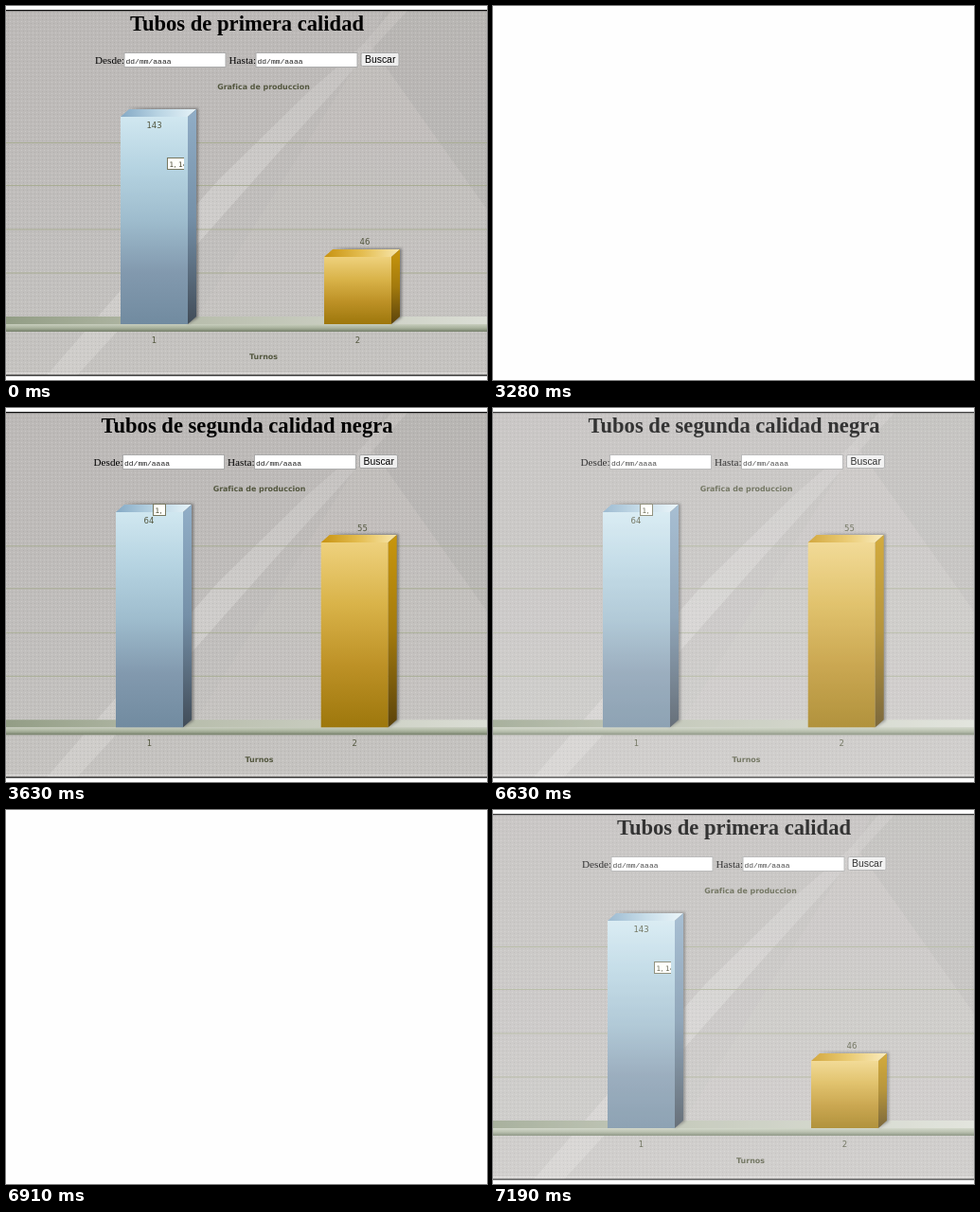
Write an HTML page that moves like this. It is 508 by 395 pixels and loops after 7260 ms.

```html
<!DOCTYPE html>
<html lang="es">
<head>
<meta charset="utf-8">
<title>Grafica de produccion</title>
<style>
html, body { margin: 0; width: 100%; height: 100%; overflow: hidden; background: #fefefe; }
#stage { display: block; width: 100%; height: 100%; }
.title { font: bold 22.6px "Liberation Serif", serif; }
.form { font: 11.2px "Liberation Serif", serif; }
.field { font: 8px "Liberation Mono", monospace; fill: #222; }
.button { font: 10.4px "Liberation Sans", sans-serif; }
.heading { font: bold 7.9px "DejaVu Sans", sans-serif; fill: #53573f; }
.value { font: 8.5px "DejaVu Sans", sans-serif; fill: #53573f; }
.tip { font: 7.5px "DejaVu Sans", sans-serif; fill: #46462f; }
.heading, .value, .title { text-anchor: middle; }
</style>
</head>
<body>
<svg id="stage" viewBox="0 0 508 395" preserveAspectRatio="none"></svg>
<script>
const STEP = 70, HOLD = 3000, LOOP = 7260;

const rect = (x, y, w, h, fill, extra = '') =>
  `<rect x="${x}" y="${y}" width="${w}" height="${h}" fill="${fill}" ${extra}/>`;
const text = (x, y, cls, content) => `<text x="${x}" y="${y}" class="${cls}">${content}</text>`;
const poly = (points, fill, extra = '') => `<polygon points="${points}" fill="${fill}" ${extra}/>`;

// Colours are spread evenly from the first edge to the last.
const gradient = (id, direction, ...colors) => {
  const [x2, y2] = direction === 'down' ? [0, 1] : [1, 0];
  const stops = colors.map((c, i) => `<stop offset="${i / (colors.length - 1)}" stop-color="${c}"/>`);
  return `<linearGradient id="${id}" x2="${x2}" y2="${y2}">${stops.join('')}</linearGradient>`;
};

const defs = `<defs>
  ${gradient('wall', 'down', '#bcb9b7', '#bebbb9', '#c1bfbd', '#c5c3c0')}
  ${gradient('beam', 'down', '#c4c1bf', '#ceccca', '#cfcdca')}
  ${gradient('blueFront', 'down', '#d0e7f0', '#b5d3e1', '#9ebccd', '#8299ae', '#718ba0')}
  ${gradient('blueSide', 'down', '#91aec7', '#7590a8', '#414c58')}
  ${gradient('blueTop', 'right', '#84a9c5', '#b9d4e3', '#e6f3f8')}
  ${gradient('goldFront', 'down', '#eed17d', '#d9b349', '#bd9126', '#9d770c')}
  ${gradient('goldSide', 'down', '#c8960d', '#a37a0d', '#5b430b')}
  ${gradient('goldTop', 'right', '#c79210', '#e4bd50', '#f8e7ae')}
  ${gradient('floorTop', 'right', '#929d85', '#b5bba9', '#c8ccbf', '#dbded5')}
  ${gradient('floorFront', 'down', '#c8cebe', '#a9b29d', '#747e69')}
  <pattern id="mesh" width="4" height="4" patternUnits="userSpaceOnUse">
    ${rect(0, 0, 1, 1, '#fff', 'opacity=".22"')}${rect(2, 2, 1, 1, '#555', 'opacity=".13"')}
  </pattern>
  <filter id="soft" x="-20%" y="-20%" width="140%" height="140%"><feGaussianBlur stdDeviation="1.5"/></filter>
</defs>`;

const backdrop =
  rect(0, 4, 508, 386, 'url(#wall)') +
  poly('384,40 508,215 508,4 400,4', '#aaa7a5', 'opacity=".22"') +
  poly('384,40 508,215 508,330 200,330', '#c9c6c4', 'opacity=".25"') +
  poly('378,40 318,92 225,183 110,313 43,390 75,390 198,256 283,160 386,46', 'url(#beam)') +
  poly('386,46 425,4 408,4 376,42', '#cac7c5', 'opacity=".55"') +
  rect(0, 5, 508, 385, 'url(#mesh)') +
  rect(0, 4, 508, 1.3, '#111') +
  rect(0, 387, 508, 1, '#dedcda') +
  rect(0, 389.5, 508, 1.3, '#222');

function field(x) {
  return rect(x + .5, 49.5, 107, 15, '#fff', 'stroke="#aaa"') + text(x + 2, 61, 'field', 'dd/mm/aaaa');
}

function form(x) {
  return text(x, 61, 'form', 'Desde:') + field(x + 30.5) +
    text(x + 141.5, 61, 'form', 'Hasta:') + field(x + 169.5) +
    rect(x + 281, 49.5, 40, 14, '#eee', 'rx="1.5" stroke="#a5a5a5"') +
    text(x + 285, 60, 'button', 'Buscar');
}

function bar(x, top, floor, color) {
  const right = x + 71, back = right + 9, lift = 8;
  return poly(`${x + 7},${top - 9} ${back + 2},${top - 9} ${back + 2},${floor - 7} ${right},${floor} ${right},${top}`,
      '#555', 'opacity=".65" filter="url(#soft)"') +
    rect(x, top, 71, floor - top, `url(#${color}Front)`) +
    poly(`${x},${top} ${x + 9},${top - lift} ${back},${top - lift} ${right},${top}`, `url(#${color}Top)`) +
    poly(`${right},${top} ${back},${top - lift} ${back},${floor - lift} ${right},${floor}`, `url(#${color}Side)`);
}

function tooltip({ x, y, width, label, open }) {
  return `<svg x="${x}" y="${y}" width="${width}" height="13">
    ${rect(.5, .5, open ? width + 9 : width - 1, 12, '#fffffa', 'stroke="#77775f"')}
    ${text(2.5, 9.5, 'tip', label)}</svg>`;
}

function page({ title, formX, center, floor, bars, tip }) {
  const grid = [192, 147, 100.5, 54.5].map(h => rect(0, floor - h, 508, 1, '#a9ad94')).join('');
  const columns = bars.map(b => bar(b.x, b.top, floor, b.color) +
    text(b.labelX, b.labelY, 'value', b.value)).join('');
  const axis = bars.map((b, i) => text(b.x + 35.5, floor + 20, 'value', i + 1)).join('');
  return backdrop + text(254.5, 26, 'title', title) + form(formX) +
    text(center, 87.5, 'heading', 'Grafica de produccion') + grid +
    rect(0, floor - 8, 508, 8, 'url(#floorTop)') +
    rect(0, floor, 508, 8, 'url(#floorFront)') +
    columns + axis + text(center, floor + 37, 'heading', 'Turnos') + tooltip(tip);
}

const pages = [
  {
    title: 'Tubos de primera calidad', formX: 94, center: 272, floor: 336,
    bars: [
      { x: 121, top: 117, color: 'blue', value: 143, labelX: 156.5, labelY: 129 },
      { x: 336, top: 265, color: 'gold', value: 46, labelX: 379, labelY: 252 }
    ],
    tip: { x: 170, y: 160, width: 18, label: '1, 143', open: true }
  },
  {
    title: 'Tubos de segunda calidad negra', formX: 92.5, center: 267.5, floor: 337.3,
    bars: [
      { x: 116, top: 110, color: 'blue', value: 64, labelX: 151, labelY: 122 },
      { x: 332.7, top: 142, color: 'gold', value: 55, labelX: 376.5, labelY: 129.5 }
    ],
    tip: { x: 155, y: 101, width: 14, label: '1,', open: false }
  }
];

const stage = document.getElementById('stage');
stage.innerHTML = defs + pages.map(p => `<g>${page(p)}</g>`).join('') +
  rect(0, 0, 508, 395, '#fefefe', 'id="veil"');
const groups = stage.querySelectorAll(':scope > g');
const veil = document.getElementById('veil');

// Each half holds a page, fades it to white in five steps, then reveals the next.
function draw(time) {
  const t = time % LOOP, half = HOLD + 9 * STEP;
  const index = t < half ? 0 : 1;
  const step = Math.max(0, Math.floor((t - index * half - HOLD) / STEP) + 1);
  const shown = step > 5 ? 1 - index : index;
  groups.forEach((g, i) => g.style.display = i === shown ? '' : 'none');
  veil.setAttribute('opacity', 1 - Math.abs(step - 5) / 5);
}

const start = performance.now();
function tick() {
  draw(performance.now() - start);
  requestAnimationFrame(tick);
}
tick();
</script>
</body>
</html>
```
